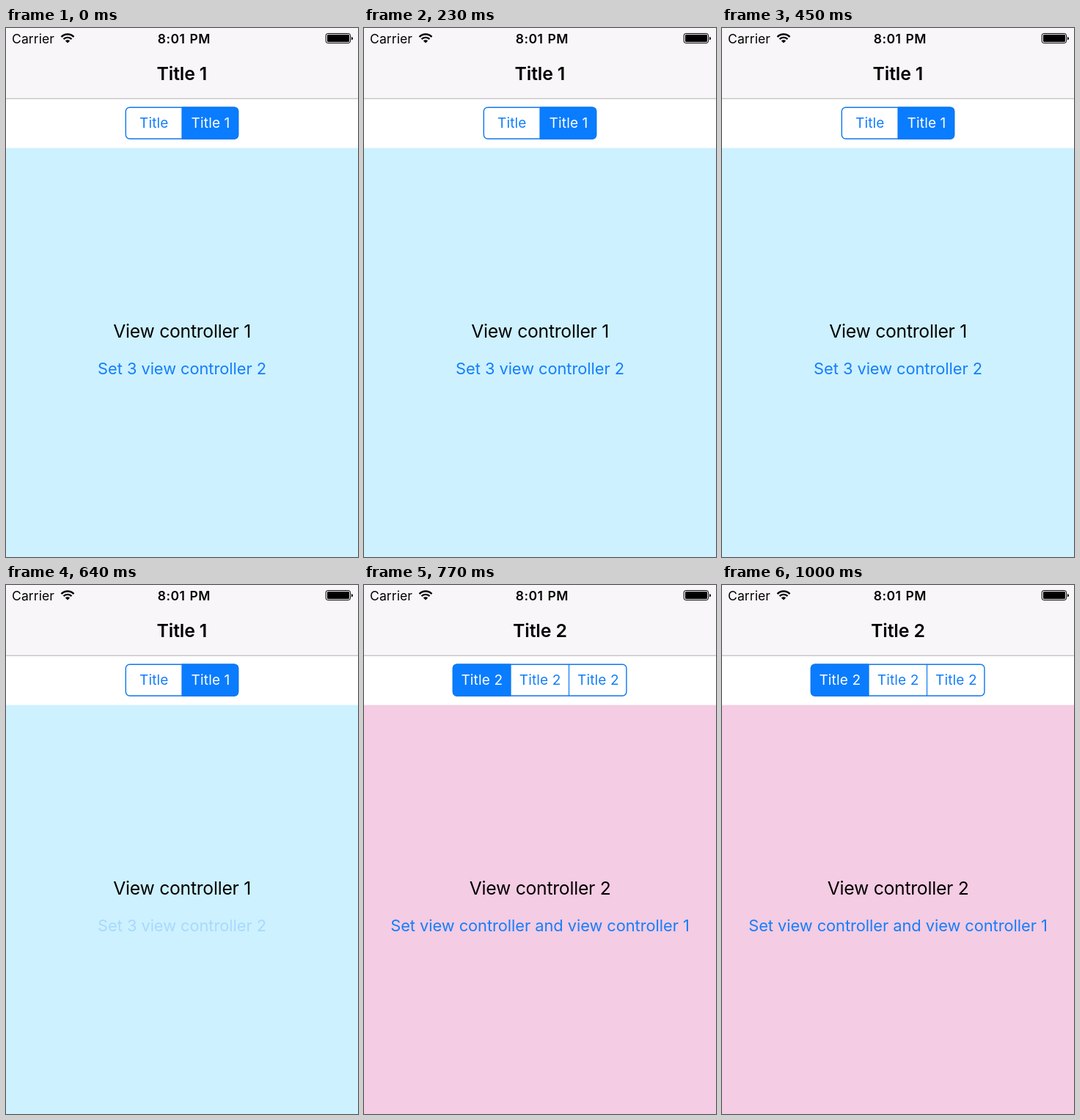
Write an HTML page that moves like this. It is 480 px wide and 721 px high and loops after 1.05 s.

```html
<!DOCTYPE html>
<html lang="en">
<head>
<meta charset="utf-8">
<title>Segmented pages</title>
<style>
  html, body { margin: 0; width: 100%; height: 100%; overflow: hidden; background: #fff; }
  svg { display: block; width: 480px; height: 721px; }
  text { font-family: Inter, Roboto, "Liberation Sans", sans-serif; text-anchor: middle; white-space: pre; }
  .status { font-size: 17.5px; letter-spacing: .1px; }
  .time { font-weight: 600; letter-spacing: .4px; word-spacing: 1.5px; }
  .nav { font-size: 24.8px; font-weight: 600; letter-spacing: -.12px; }
  .label { font-size: 24.7px; letter-spacing: -.25px; }
  .link { font-size: 21.8px; letter-spacing: -.04px; fill: #147efb; }
  .tab { font-size: 19px; letter-spacing: .15px; fill: #147efb; }
  .tab.on { fill: #fff; }
  .blue { fill: #0a7cff; }
  .line { fill: #0c78ee; }
  .frame { fill: none; stroke: #0c78ee; stroke-width: 1.4; }
</style>
</head>
<body>
<svg viewBox="0 0 480 721">
  <rect width="480" height="721" fill="#fff"/>
  <rect width="480" height="96" fill="#f8f6f8"/>
  <rect y="95.7" width="480" height="1" fill="#b0afb1"/>

  <text class="status" x="8" y="21" style="text-anchor:start">Carrier</text>
  <g id="wifi" fill="none" stroke="#000"></g>
  <text class="status time" x="242.8" y="21">8:01 PM</text>
  <rect x="436.2" y="7.5" width="33.3" height="13" rx="2.6" fill="none" stroke="#000"/>
  <rect x="438" y="9" width="30" height="10" rx="1.2"/>
  <path d="M471 12 q2 .6 2 2.25 t-2 2.25 z"/>

  <g id="pages"></g>
</svg>
<script>
const LOOP = 1050, PRESS = 590, SWAP = 680;
const $ = id => document.getElementById(id);

const pages = [
  { id: 'first', fill: '#cdf1fe', nav: 'Title 1', label: 'View controller 1',
    link: 'Set 3 view controller 2', edges: [162.7, 240, 317.3],
    tabs: ['Title', 'Title 1'], active: 1 },
  { id: 'second', fill: '#f4cce3', nav: 'Title 2', label: 'View controller 2',
    link: 'Set view controller and view controller 1', edges: [120.7, 200, 279.5, 358.5],
    tabs: ['Title 2', 'Title 2', 'Title 2'], active: 0 }
];

const text = (cls, x, y, s) => `<text class="${cls}" x="${x}" y="${y}">${s}</text>`;

function segments({ id, edges, tabs, active }) {
  const left = edges[0], width = edges[edges.length - 1] - left;
  const clip = `${id}-clip`;
  const dividers = edges.slice(1, -1)
    .map(x => `<rect class="line" x="${x - .6}" y="108" width="1.2" height="43"/>`).join('');
  const titles = tabs.map((s, i) =>
    text(i === active ? 'tab on' : 'tab', (edges[i] + edges[i + 1]) / 2 + .4, 136.4, s)).join('');
  return `<clipPath id="${clip}"><rect x="${left}" y="107.5" width="${width}" height="44.2" rx="6"/></clipPath>
    <rect class="blue" clip-path="url(#${clip})" x="${edges[active]}" y="107"
      width="${edges[active + 1] - edges[active]}" height="45"/>
    <rect class="frame" x="${left + .6}" y="108.2" width="${width - 1.2}" height="42.8" rx="5.4"/>
    ${dividers}${titles}`;
}

$('pages').innerHTML = pages.map(p => `<g id="${p.id}">
  <rect y="163.6" width="480" height="558" fill="${p.fill}"/>
  ${text('nav', 239.9, 71, p.nav)}
  ${segments(p)}
  ${text('label', 240.2, 422.4, p.label)}
  <g id="${p.id}-link">${text('link', 240, 472.4, p.link)}</g>
</g>`).join('');

// Concentric bands: [radius, thickness]
$('wifi').innerHTML = [[12, 2.5], [7.7, 2.4], [2.2, 4.4]].map(([r, w]) => {
  const d = r * Math.SQRT1_2;
  return `<path stroke-width="${w}" d="M${84 - d} ${20.6 - d} A${r} ${r} 0 0 1 ${84 + d} ${20.6 - d}"/>`;
}).join('');

// Each track holds [time, opacity] steps
const tracks = {
  'first': [[0, 1], [SWAP, 0]],
  'second': [[0, 0], [SWAP, 1]],
  'first-link': [[0, 1], [PRESS, .2]]
};
for (const [id, steps] of Object.entries(tracks)) {
  const frames = [...steps, [LOOP, steps[steps.length - 1][1]]]
    .map(([t, opacity]) => ({ offset: t / LOOP, opacity, easing: 'step-end' }));
  $(id).animate(frames, { duration: LOOP, iterations: Infinity });
}
</script>
</body>
</html>
```
